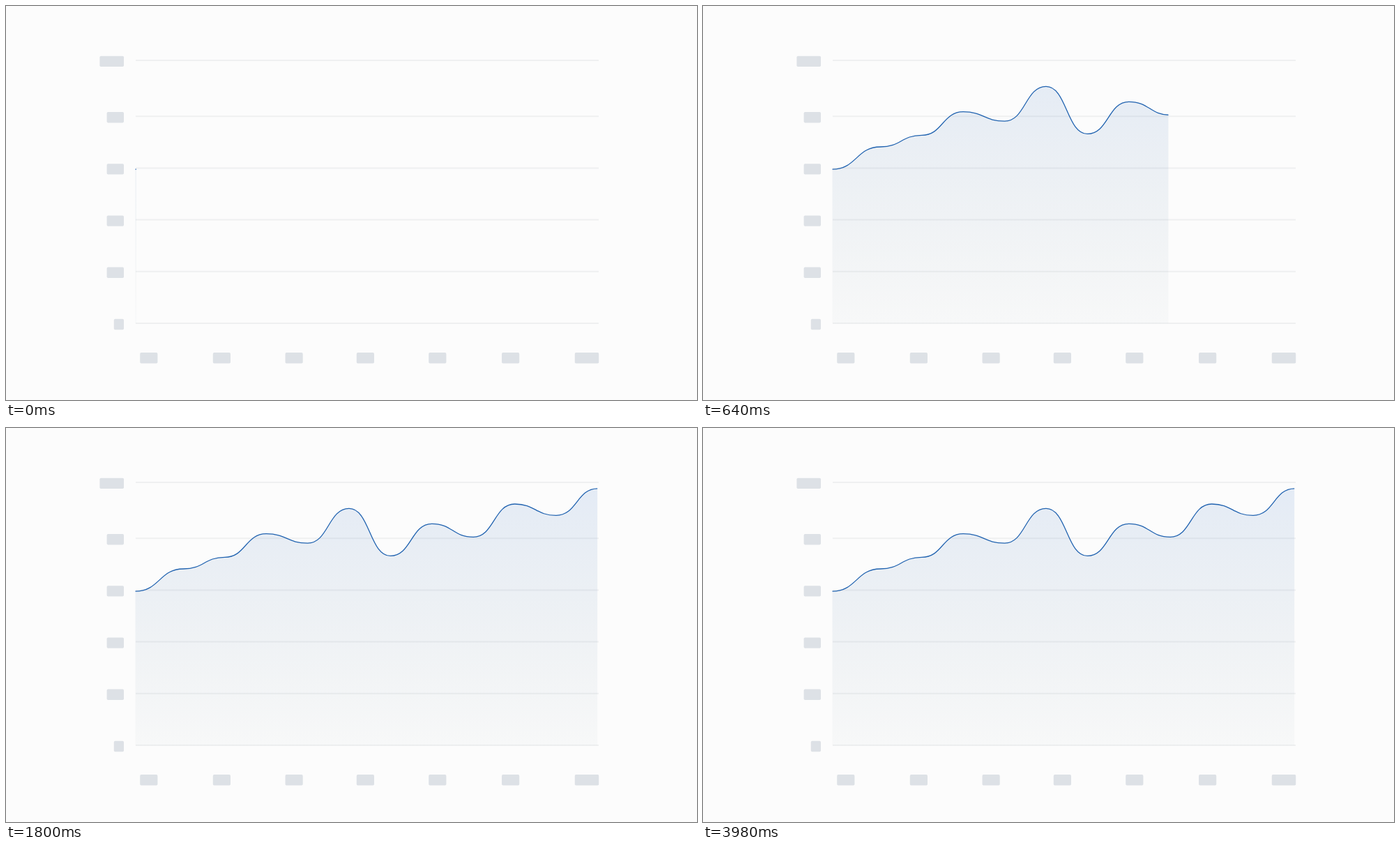
An HTML page that plays this animation: 991 by 565 pixels, repeating every 4120 ms.

```html
<!DOCTYPE html>
<html lang="en">
<head>
<meta charset="utf-8">
<title>Area chart</title>
<style>
  html, body { margin: 0; width: 100%; height: 100%; overflow: hidden; background: #fcfcfc; }
  svg { display: block; }
</style>
</head>
<body>
<svg width="991" height="565" viewBox="0 0 991 565">
  <defs>
    <linearGradient id="fade" x1="0" y1="87" x2="0" y2="455" gradientUnits="userSpaceOnUse">
      <stop offset="0" stop-color="#2264c0" stop-opacity=".11"/>
      <stop offset="1" stop-color="#204858" stop-opacity=".022"/>
    </linearGradient>
    <clipPath id="reveal"><rect id="window" x="185" y="60" width="2" height="396"/></clipPath>
  </defs>
  <g id="grid" stroke="#eff0f1" stroke-width="2"></g>
  <g id="labels" fill="#dde1e6"></g>
  <g clip-path="url(#reveal)">
    <path id="area" fill="url(#fade)"/>
    <path id="line" fill="none" stroke="#2163b0" stroke-width="1.3"/>
  </g>
</svg>
<script>
const LOOP = 4120, STEP = 20, DRAW = 1312;
const LEFT = 185.5, RIGHT = 848.4, TOP = 77.9, BASE = 455, GAP = 59.4;
const $ = id => document.getElementById(id);

function add(parent, name, attrs) {
  const el = document.createElementNS('http://www.w3.org/2000/svg', name);
  for (const k in attrs) el.setAttribute(k, attrs[k]);
  parent.append(el);
}
const label = (x, y, width) =>
  add($('labels'), 'rect', { x, y, width, height: 15.4, rx: 1.8 });

// Rows 0, 20 ... 100, each placeholder as wide as its digits
for (let i = 0; i <= 5; i++) {
  const y = i < 5 ? BASE - i * 74.2 : TOP;
  const w = 4 + 10.2 * String(i * 20).length;
  add($('grid'), 'line', { x1: 186, x2: 850, y1: y, y2: y });
  label(169 - w, y - 6.2, w);
}
[204.8, 309.4, 413.1, 515.4, 618.8, 723.6, 833].forEach((x, i) => {
  const w = i < 6 ? 25.2 : 34.5;
  label(x - w / 2, 497.1, w);
});

// Curve with level tangents at each value
const values = [234.2, 202, 185.4, 151.7, 165.1, 115.4, 183.4, 137.3, 156.3, 109, 125.3, 86.8];
const last = values.length - 1;
const xAt = i => i ? RIGHT - (last - i) * GAP : LEFT;
let d = `M${LEFT} ${values[0]}`;
for (let i = 1; i <= last; i++) {
  const mid = (xAt(i - 1) + xAt(i)) / 2;
  d += `C${mid} ${values[i - 1]} ${mid} ${values[i]} ${xAt(i)} ${values[i]}`;
}
$('line').setAttribute('d', d);
$('area').setAttribute('d', `${d}V${BASE}H${LEFT}Z`);
const length = $('line').getTotalLength();

// Soft start, long cubic ease-out
const ease = u => 1 - (1 - u ** 1.45) ** 3;

function draw(now) {
  const t = Math.floor((now % LOOP) / STEP) * STEP;
  const p = ease(Math.min(1, t / DRAW));
  const edge = $('line').getPointAtLength(p * length).x;
  $('window').setAttribute('width', Math.max(1.8, edge - 185));
}

let start;
function tick(now) {
  start ??= now;
  draw(now - start);
  requestAnimationFrame(tick);
}
draw(0);
requestAnimationFrame(tick);
</script>
</body>
</html>
```
